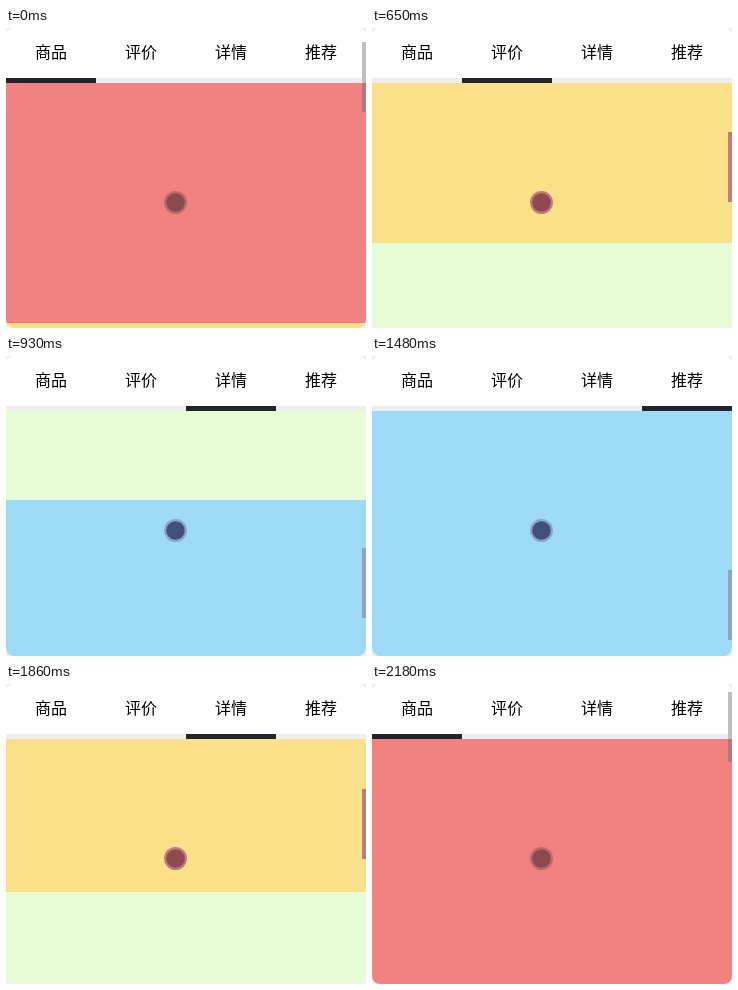
An HTML page with a canvas for the animation above (2.38 s loop, 360x300 px).

```html
<!DOCTYPE html>
<html lang="zh-CN">
<head>
<meta charset="utf-8">
<title>Tabs</title>
<style>
  html, body { margin: 0; width: 100%; height: 100%; overflow: hidden; background: #f0f0f0; }
  .stage { position: relative; width: 360px; height: 300px; border-radius: 8px; overflow: hidden; background: #fff; }
  canvas { position: absolute; left: 0; top: 0; }
  nav {
    position: absolute; left: 0; top: 0; width: 360px; display: flex;
    font: 16px/46px "Noto Sans CJK SC", "Noto Sans CJK", "Noto Sans CJK JP", sans-serif;
    color: #000; text-align: center;
  }
  nav span { width: 90px; }
</style>
</head>
<body>
<div class="stage">
  <canvas width="360" height="300"></canvas>
  <nav><span>商品</span><span>评价</span><span>详情</span><span>推荐</span></nav>
</div>
<script>
const LOOP = 2380, TURN = 1480;
const HEAD = 55, SECTION = 300, THUMB = 70, RATIO = 4.22;
const ctx = document.querySelector('canvas').getContext('2d');

const sections = [
  { fill: '#f28181', thumb: '#b97777', ring: '#bd6a6c', dot: '#8b4a4c' },
  { fill: '#fbe08a', thumb: '#be7b80', ring: '#c17b7c', dot: '#8f4a50' },
  { fill: '#e5fcd5', thumb: '#9fadb9', ring: '#9fadb9', dot: '#5a6479' },
  { fill: '#9ddaf5', thumb: '#8aa5c6', ring: '#8aa5c6', dot: '#40507d' }
];

// [time, scroll offset]
const down = [[150, 60], [420, 130], [650, 440], [930, 811], [1060, 915]];
const up = [[1430, 915], [1480, 905], [1860, 447], [1990, 262], [2180, 36], [2260, 0]];

// Redraw times as runs: [start, end, intervals]
const runs = [
  [200, 420, 4], [420, 470, 1], [470, 650, 4], [650, 750, 2], [750, 930, 4],
  [930, 980, 1], [980, 1060, 2], [1480, 1860, 8], [1860, 1890, 1],
  [1890, 1990, 2], [1990, 2040, 1], [2040, 2180, 3]
];
const ticks = [0];
for (const [from, to, n] of runs) {
  for (let i = 0; i <= n; i++) ticks.push(from + (to - from) * i / n);
}

// Monotone cubic through the given points
function curve(points, t) {
  const last = points.length - 1;
  if (t <= points[0][0]) return points[0][1];
  if (t >= points[last][0]) return points[last][1];
  const slope = i => (points[i + 1][1] - points[i][1]) / (points[i + 1][0] - points[i][0]);
  const tangent = i => {
    if (i === 0 || i === last) return 0;
    const a = slope(i - 1), b = slope(i);
    return 2 * a * b / (a + b);
  };
  let i = 0;
  while (t >= points[i + 1][0]) i++;
  const [t0, y0] = points[i], [t1, y1] = points[i + 1];
  const h = t1 - t0, u = (t - t0) / h, v = 1 - u;
  return y0 * (1 + 2 * u) * v * v + y1 * u * u * (3 - 2 * u)
    + h * u * v * (tangent(i) * v - tangent(i + 1) * u);
}

function rect(color, x, y, w, h) {
  ctx.fillStyle = color;
  ctx.fillRect(x, y, w, h);
}

function disc(color, r) {
  ctx.fillStyle = color;
  ctx.beginPath();
  ctx.arc(169.5, 174.5, r, 0, Math.PI * 2);
  ctx.fill();
}

function band(top, bottom, paint) {
  if (bottom <= top) return;
  ctx.save();
  ctx.beginPath();
  ctx.rect(0, top, 360, bottom - top);
  ctx.clip();
  paint();
  ctx.restore();
}

function draw(time) {
  const t = ticks.reduce((best, k) => k <= time ? Math.max(best, k) : best, 0);
  const rising = t >= TURN;
  const scroll = Math.round(curve(rising ? up : down, t));
  const thumbY = Math.floor(scroll / RATIO);
  // A tab changes once its section has fully left the view
  const tab = rising ? Math.ceil((scroll - HEAD) / SECTION) : Math.floor(scroll / SECTION);
  const active = Math.max(0, Math.min(3, tab));
  const thumb = color => rect(color, 356, thumbY, 4, THUMB);

  sections.forEach((s, i) => {
    const top = HEAD + i * SECTION - scroll;
    band(Math.max(HEAD, top), Math.min(300, top + SECTION), () => {
      rect(s.fill, 0, 0, 360, 300);
      thumb(s.thumb);
      disc(s.ring, 11.5);
      disc(s.dot, 9.3);
    });
  });

  band(0, HEAD, () => {
    rect('#fff', 0, 0, 360, 50);
    rect('#eee', 0, 50, 360, 5);
    rect('#22232b', active * 90, 50, 90, 5);
    thumb('#bfbfbf');
  });
}

const start = performance.now();
function frame() {
  draw((performance.now() - start) % LOOP);
  requestAnimationFrame(frame);
}
frame();
</script>
</body>
</html>
```
